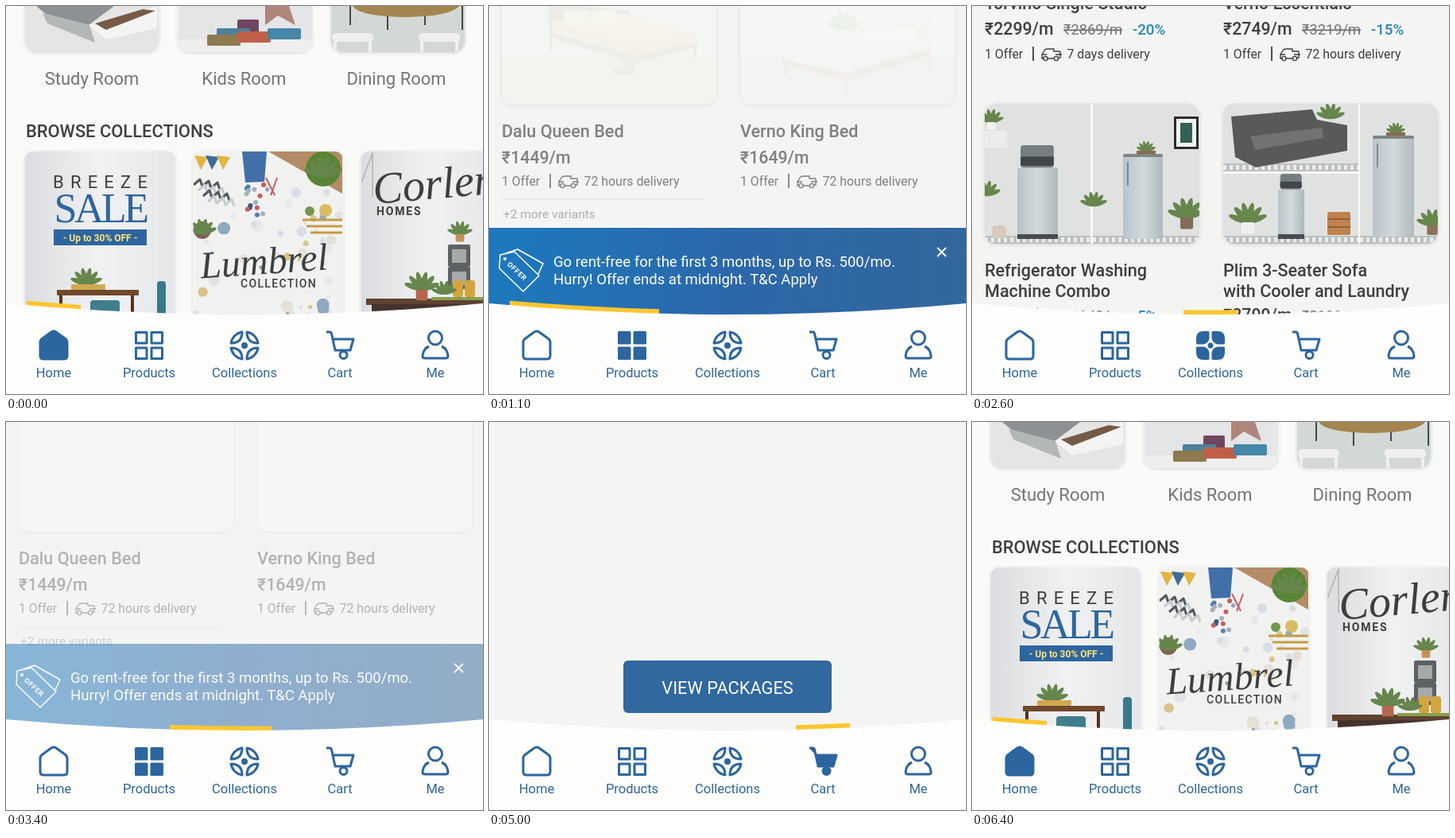
An HTML page that plays this animation: 600x488 px, repeating every 6.5 s.

```html
<!DOCTYPE html>
<html lang="en">
<head>
<meta charset="utf-8">
<title>Furniture rental app</title>
<style>
html, body { margin: 0; height: 100%; overflow: hidden; background: #f4f5f3; }
svg { display: block; width: 100vw; height: 100vh; font-family: Roboto, sans-serif; }
.nav g { stroke: #2d659e; fill: none; stroke-width: 3; stroke-linejoin: round; }
.nav .on { fill: #2d659e; }
.mid { text-anchor: middle; }
.medium { font-weight: 500; }
.script { font-family: "Liberation Serif", serif; font-style: italic; }
</style>
</head>
<body>
<svg id="stage" viewBox="0 0 600 488"></svg>
<script>
const BLUE = '#2d659e', INK = '#3d3e3f', GREY = '#737475', WOOD = '#70482d';

const text = (x, y, s, size, fill = INK, cls = '', more = '') =>
  `<text x="${x}" y="${y}" font-size="${size}" fill="${fill}" class="${cls}" ${more}>${s}</text>`;
const rect = (x, y, w, h, fill, r = 0) =>
  `<rect x="${x}" y="${y}" width="${w}" height="${h}" rx="${r}" fill="${fill}"/>`;
const dot = (x, y, r, fill) => `<circle cx="${x}" cy="${y}" r="${r}" fill="${fill}"/>`;
const poly = (pts, fill) => `<polygon points="${pts}" fill="${fill}"/>`;
const line = (d, stroke, w = 2) =>
  `<path d="${d}" fill="none" stroke="${stroke}" stroke-width="${w}" stroke-linejoin="round"/>`;
const repeat = (n, f) => Array.from({ length: n }, (_, i) => f(i)).join('');

let seed = 7;
const rand = (a, b) => a + (b - a) * ((seed = seed * 16807 % 2147483647) / 2147483647);
const pick = list => list[Math.floor(rand(0, list.length))];

const plant = (x, y, r) => repeat(6, i =>
  `<ellipse cx="${x}" cy="${y - r / 2}" rx="${r * .16}" ry="${r * .55}" fill="#66864c" transform="rotate(${i * 28 - 70} ${x} ${y})"/>`);
const potted = (x, y, r, pot) => plant(x, y, r) + rect(x - r / 3, y, r * .67, r * .6, pot, 2);

// Rounded picture on a pale card
let clips = 0;
function card(x, y, w, h, r, art) {
  const id = 'c' + clips++;
  return `<clipPath id="${id}">${rect(x, y, w, h, '#000', r)}</clipPath>
    <g filter="url(#soft)">${rect(x, y, w, h, '#f9faf8', r)}</g>
    <g class="pic" clip-path="url(#${id})">${art}</g>`;
}

// Home
const study = rect(24, 0, 168, 60, '#e4e5e4') + poly('38,0 136,0 104,24 50,10', '#8c9194') +
  poly('46,9 105,24 112,46 52,22', '#b4b7b7') + poly('104,24 190,0 190,28 126,42', '#f4f4f2') +
  poly('112,22 172,4 188,6 126,30', '#765a45');

const kids = rect(217, 0, 168, 60, '#e3e5e6') + rect(217, 42, 168, 18, '#efeeec') +
  poly('326,0 356,0 364,24 342,12 326,24', '#b0857c') + rect(291, 17, 27, 18, '#70455f', 2) + rect(265, 28, 42, 12, '#4d8199', 2) +
  ['#8e7a4f', '#c0604a', '#4686a8'].map((c, i) => rect(253 + i * 38, 36 - i * 4, 42, 14, c, 2)).join('');

const dining = rect(408, 0, 170, 60, '#d3d8d5') + repeat(4, i => line(`M${433 + i * 47} 0V${i % 2 ? 30 : 24}`, '#45494a')) +
  [436, 545].map(x => line(`M${x - 22} 58V38H${x + 22}V58`, '#eff0ee', 4) + rect(x - 26, 34, 52, 11, '#eff0ee', 5)).join('') +
  '<path d="M436 0H570Q560 13 502 14Q444 13 436 0Z" fill="#a4854f"/>';

const saleCard = rect(24, 183, 188, 220, 'url(#wall)') + rect(192, 183, 20, 220, '#e6e7e9') +
  rect(106, 370, 37, 24, '#407d8e', 4) + rect(190, 346, 11, 44, '#39788c', 4) +
  repeat(2, i => line(`M${69 + i * 90} 363V390`, '#54351f', 4)) + rect(64, 357, 103, 7, WOOD, 1) +
  plant(101, 350, 20) + rect(82, 350, 43, 7, '#d1a850', 1) +
  text(59, 229, 'BREEZE', 22, INK, '', 'letter-spacing="8.2"') +
  text(118.5, 272, 'SALE', 52, BLUE, 'mid', 'font-family="Liberation Serif, serif" letter-spacing="-3.5"') +
  rect(60, 281, 117, 20, BLUE) + text(118.5, 296, '- Up to 30% OFF -', 12, '#ffe27a', 'mid', 'font-weight="700"');

const clutter = repeat(45, () => dot(rand(238, 420), rand(225, 400), rand(2, 8),
  pick(['#dfe3e6', '#e4e0d6', '#d6dee8', '#e6e9e6', '#d9c48a', '#8fa9c0'])));
const zigzag = repeat(4, i => line(`M${236 + i * 6} ${225 + i * 7}` + 'l8 -7l3 9'.repeat(3), i % 2 ? '#c6cbd0' : '#53575e', 3));
const beads = repeat(14, () => dot(rand(302, 325), rand(224, 265), 3, pick(['#4d81ad', '#385b82', '#a2b1bc', '#c95b60'])));
const craftCard = rect(235, 183, 188, 220, '#f1f2f0') + clutter + zigzag + beads +
  poly('330,183 423,183 423,236', '#b38c66') + poly('297,183 328,183 325,221 301,222', '#426fa8') +
  repeat(3, i => poly(`${237 + i * 14},188 ${254 + i * 14},190 ${245 + i * 14},206`, i % 2 ? '#416b97' : '#e2b440')) +
  dot(399, 205, 22, '#588535') + plant(399, 214, 24) + line('M327 216L338 238M341 216L333 238', '#c35d60') +
  repeat(3, i => line(`M${373 + i * 5} ${269 + i * 8}H423`, '#c39c47', 3)) + dot(382, 258, 6, '#73984d') + dot(402, 257, 8, '#d9bc62') +
  dot(247, 282, 11, '#776755') + plant(247, 286, 18) +
  text(325, 337, 'Lumbrel', 48, INK, 'mid script', 'transform="rotate(-4 325 330)"') +
  text(343, 354, 'COLLECTION', 14, INK, 'mid medium', 'letter-spacing="1.3"');

const homesCard = rect(447, 183, 170, 220, 'url(#wall)') + line('M447 222L461 185V240', '#b3b2af', 1.5) +
  repeat(2, i => rect(556, 300 + i * 28, 28, 28, '#5d6164', 2) + rect(561, 306 + i * 28, 18, 17, '#a5a9a9')) +
  potted(571, 287, 16, '#c49155') + repeat(2, i => rect(562 + i * 15, 345, 13, 21, '#d3a53c', 3)) +
  rect(453, 368, 160, 8, '#604233') + rect(460, 375, 140, 20, '#45332c') + rect(535, 366, 72, 4, '#8aa04c') +
  potted(523, 357, 22, '#b66650') + plant(551, 362, 16) +
  text(463, 249, 'Corlenda', 56, INK, 'script', 'transform="rotate(-5 463 249)"') +
  text(466, 263, 'HOMES', 14, INK, '', 'font-weight="700" letter-spacing="1.8"');

const home = [[study, 'Study Room'], [kids, 'Kids Room'], [dining, 'Dining Room']].map(([art, name], i) =>
    card(24 + i * 192.5, -110, 168, 168, 14, art) + text(108 + i * 191.5, 99, name, 22, GREY, 'mid')).join('') +
  text(25, 165, 'BROWSE COLLECTIONS', 21.9, INK, 'medium') +
  [saleCard, craftCard, homesCard].map((art, i) => card(24 + i * 211.5, 183, 188, 220, 9, art)).join('');

// Products
const bed = (place, shift, extra, [wall, floor, head, wood, side, cover, pillow]) => `<g transform="${place}">` +
  rect(0, -170, 270, 216, wall) + rect(0, 44, 270, 64, floor) + extra + `<g transform="translate(${shift})">` +
  line('M62 10V38M166 44V68M243 30V47', wood, 4) + poly('58,-22 160,-12 164,12 60,12', head) +
  poly('62,14 166,44 246,26 246,34 166,54 62,22', wood) + poly('64,2 154,-8 244,16 244,28 166,44 64,12', side) +
  poly('64,2 154,-8 244,16 166,32', cover) + repeat(2, i => rect(78 + i * 34, -13, 32, 20, pillow, 4)) + '</g></g>';

const yellowBed = bed('translate(16)', '0 0', rect(140, 60, 26, 8, '#6d4c32', 2) + plant(155, 60, 11),
  ['#d3d2cc', '#b9afa0', '#70462c', '#85522b', '#cf9d42', '#e8bb60', '#efcd82']);
const whiteBed = bed('translate(586) scale(-1 1)', '-30 22', line('M132 40V11H148V40', '#47635c') + plant(140, 11, 22),
  ['#e0e4e3', '#bcb9af', '#d0c3ae', '#9d5f35', '#cbd1d2', '#e8ebeb', '#f0efea']);

const truck = (x, y) => `<g transform="translate(${x} ${y})" fill="none" stroke="${INK}" stroke-width="1.4">
  <path d="M3 13H1V8L4 3Q5 1 8 1H16V4H24M8 13H17M18 8H26M1 8H7M24 4V12H22"/>
  <circle cx="5.5" cy="13" r="2.6"/><circle cx="19" cy="13" r="2.6"/></g>`;
const offer = (x, y, when) => text(x, y, '1 Offer', 15.8) + line(`M${x + 61} ${y - 15}v18`, INK, 1.8) +
  truck(x + 71, y - 13) + text(x + 103.5, y, when, 15.9);
const product = (x, name, price, art) => card(x, -170, 270, 276, 14, art) +
  text(x, 147, name, 21.6, INK, 'medium') + text(x, 180, price, 21.3, INK, 'medium') + offer(x, 208, '72 hours delivery');

const products = product(16, 'Dalu Queen Bed', '₹1449/m', yellowBed) + product(316, 'Verno King Bed', '₹1649/m', whiteBed) +
  line('M17 225H273', '#d9dad8', 1) + text(18, 249, '+2 more variants', 15.5, '#858686');

const banner = rect(0, 279, 600, 125, 'url(#sea)') +
  text(81, 328, 'Go rent-free for the first 3 months, up to Rs. 500/mo.', 18.5, '#fff') +
  text(81, 350, 'Hurry! Offer ends at midnight. T&amp;C Apply', 18.5, '#fff') +
  line('M564 304l11 11M575 304l-11 11', '#fff', 1.8) +
  line('M14 313L32 309 63 339 43 359 13 330ZM21 311L36 306 68 324 62 337', '#fff', 1.5) + dot(20, 318, 2, '#fff') +
  text(36, 337, 'OFFER', 9, '#fff', 'mid', 'font-weight="700" letter-spacing=".6" transform="rotate(43 36 333)"');

// Collections
const wall = (x, y, w, h) => rect(x, y, w, h, '#e0e2e2') + rect(x, y + h - 10, w, 10, '#bcc0c1') +
  `<path d="M${x} ${y + h - 5}h${w}" stroke="#eceeed" stroke-width="6" stroke-dasharray="4 4"/>`;
const washer = (x, y, w, h) => rect(x, y + h * .24, w, h * .76, 'url(#steel)', 2) + rect(x, y + h - 6, w, 6, '#484c4e') +
  rect(x + w * .08, y, w * .82, h * .24, '#777e80', 4) + rect(x + w * .08, y + h * .12, w * .82, h * .1, '#414648', 2);
const fridge = (x, y, w, h) => rect(x, y, w, h, 'url(#steel)', 3) + rect(x, y, w, 4, '#7d8586', 2) +
  line(`M${x + 6} ${y + 10}v30`, '#818a8c') + rect(x + 17, y - 4, 24, 4, '#8a6a4b') + plant(x + 29, y - 4, 12);

const combo = wall(16, 123, 133, 176) + wall(152, 123, 134, 176) + washer(57, 175, 51, 118) + fridge(190, 186, 50, 107) +
  potted(24, 146, 16, '#f4f4f2') + rect(16, 157, 28, 22, '#ebecea') + plant(18, 238, 18) + plant(153, 251, 17) +
  rect(25, 276, 18, 16, '#d9c9b8', 5) + rect(254, 139, 31, 41, '#292d2f') + rect(257, 142, 25, 35, '#f2f3f1') +
  rect(262, 147, 15, 25, '#326255') + potted(270, 266, 24, '#846b59');

const couchSet = wall(316, 123, 170, 85) + wall(316, 211, 170, 88) + wall(488, 123, 98, 176) + plant(451, 141, 18) +
  poly('326,139 428,130 434,143 472,150 472,182 357,203 331,190', '#57595a') + poly('350,164 440,153 442,166 356,181', '#707273') +
  washer(385, 211, 33, 82) + potted(347, 272, 24, '#eef0ee') + rect(447, 259, 29, 29, '#c0834f', 2) +
  repeat(2, i => line(`M447 ${268 + i * 10}h29`, '#86542e', 1.5)) + fridge(504, 163, 52, 127) + potted(579, 276, 20, '#8d725e');

const deal = (x, y, now, was, off) => text(x, y, now, 21.3, INK, 'medium') +
  text(x + 99, y, was, 18.3, GREY, '', 'text-decoration="line-through"') + text(x + 186, y, off, 18.8, '#2587bd', 'medium');
const bundle = (x, art, above, below) => text(x, 4, above, 21.6, INK, 'medium') + card(x, 123, 270, 176, 14, art) +
  below.map((s, i) => text(x, 340 + i * 26, s, 21.6, INK, 'medium')).join('');

const collections = bundle(16, combo, 'Torvino Single Studio', ['Refrigerator Washing', 'Machine Combo']) +
  bundle(316, couchSet, 'Verno Essentials', ['Plim 3-Seater Sofa', 'with Cooler and Laundry']) +
  deal(16, 36, '₹2299/m', '₹2869/m', '-20%') + deal(316, 36, '₹2749/m', '₹3219/m', '-15%') +
  offer(16, 66, '7 days delivery') + offer(316, 66, '72 hours delivery') +
  deal(16, 396, '₹1849/m', '₹1949/m', '-5%') + deal(316, 396, '₹2799/m', '₹3199/m', '-12%');

const cart = rect(169, 300, 262, 66, '#30689f', 6) + text(300, 342, 'VIEW PACKAGES', 21.8, '#fff', 'mid');

// Icons centred on 0,0; a second drawing replaces the first when active
const turns = d => repeat(4, i => `<path d="${d}" transform="rotate(${i * 90})"/>`);
const icons = [
  ['Home', '<path d="M-17 13V-4Q-17 -7 -14 -9L-3 -17Q0 -19 3 -17L14 -9Q17 -7 17 -4V13Q17 17 13 17H-13Q-17 17 -17 13Z"/>'],
  ['Products', turns('M3 -16.5H16.5V-3H3Z')],
  ['Collections', turns('M3 -17A17 17 0 0 1 17 -3Q3 -3 3 -17Z') + dot(0, 0, 2.5, BLUE),
    turns('M3 -16.5H9Q16.5 -16.5 16.5 -9V-3H9Q4 -4 3 -9Z') + dot(0, 0, 2, BLUE)],
  ['Cart', '<path d="M-17 -17H-13Q-11 -17 -10.5 -15L-6 6H13L17 -8H-9"/><circle cx="4.5" cy="12" r="4.5"/>'],
  ['Me', '<circle cy="-9.5" r="8.5"/><path d="M-8 1Q-15 4 -16 13Q-16 16 -13 16H13Q16 16 16 13Q15 4 8 1"/>']
];
const nav = icons.map(([name, off, on = off], i) => `<g transform="translate(${60 + 120 * i} 427)">
  <g class="off">${off}</g><g class="on">${on}</g></g>` + text(60 + 120 * i, 467, name, 16.5, BLUE, 'mid')).join('');

const scene = (body, back = '', front = '') => `<g class="scene">${back}<g class="body">${body}</g><g class="front">${front}</g></g>`;
const gradient = (id, ...colors) => `<linearGradient id="${id}">` + colors.map((c, i) =>
  `<stop offset="${i / (colors.length - 1)}" stop-color="${c}"/>`).join('') + '</linearGradient>';

stage.innerHTML = '<defs>' + gradient('sea', '#1d79bd', '#2b68aa', '#33679d') +
  gradient('steel', '#b9c3c7', '#d3dadd', '#b0b9bd') + gradient('wall', '#dcdde0', '#f0f1f2', '#e6e7e8') +
  `<filter id="soft"><feDropShadow dx="0" dy="1" stdDeviation="2" flood-opacity=".15"/></filter>
  <clipPath id="span"><rect id="slot" y="360" height="40"/></clipPath></defs>` +
  rect(0, 0, 600, 488, '#f4f5f3') + scene(home, rect(0, 0, 600, 488, '#fafbf9')) +
  scene(products, '', banner) + scene(collections) + scene(cart) +
  `<path d="M0 371.5Q300 399.5 600 371.5" fill="none" stroke="#fdc62f" stroke-width="6" clip-path="url(#span)"/>
  <path d="M0 374Q300 402 600 374V488H0Z" fill="#fdfefc"/><g class="nav">${nav}</g>`;

const all = (q, root = stage) => [...root.querySelectorAll(q)];
const scenes = all('.scene'), offIcons = all('.off'), onIcons = all('.on');
const clamp = v => Math.max(0, Math.min(1, v));
const smooth = v => v * v * (3 - 2 * v);
const show = (el, on) => { el.style.display = on ? '' : 'none'; };

const LOOP = 6500, STEP = 100, MOVE = 500, FIRST = 900, STAY = 1200;
const tour = [0, 1, 2, 1, 3, 0];

function draw(now) {
  const t = Math.floor(now % LOOP / STEP) * STEP;
  const visit = Math.floor((t - FIRST) / STAY) + 1;
  const to = tour[visit], from = tour[Math.max(0, visit - 1)];
  const p = visit ? clamp((t - FIRST - (visit - 1) * STAY) / MOVE) : 1;
  const ease = 1 - (1 - p) ** 2, early = clamp(p / .4), late = clamp((p - .4) / .6);

  // The page is swapped at once; its content rises and fades in, pictures last
  scenes.forEach((el, i) => show(el, i === to));
  const [body] = all('.body', scenes[to]), [front] = all('.front', scenes[to]);
  body.setAttribute('opacity', ease);
  body.setAttribute('transform', `translate(0 ${50 * (1 - ease)})`);
  front.setAttribute('opacity', early);
  all('.pic', body).forEach(pic => pic.setAttribute('opacity', clamp((p - .35) / .5)));

  // The leading end of the marker arrives first, then the other end follows
  const a = 26 + 120 * from, d = 120 * (to - from);
  const lead = a + d * smooth(early), tail = a + d * smooth(late);
  slot.setAttribute('x', Math.min(lead, tail));
  slot.setAttribute('width', Math.abs(lead - tail) + 68);

  onIcons.forEach((icon, i) => { show(icon, i === to); show(offIcons[i], i !== to); });
  requestAnimationFrame(draw);
}
draw(performance.now());
</script>
</body>
</html>
```
